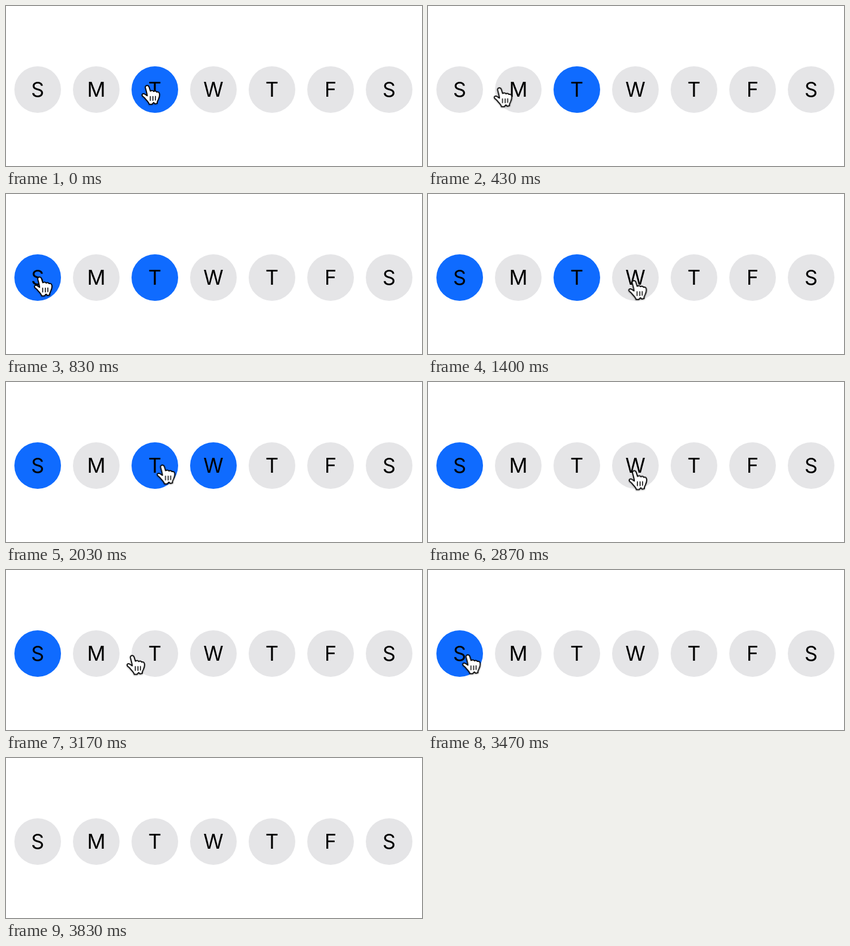
Animation, 696 px wide and 268 px high, one loop 4160 ms. Source, as an HTML page:

```html
<!DOCTYPE html>
<html lang="en">
<head>
<meta charset="utf-8">
<title>Day picker</title>
<style>
  html, body { margin: 0; width: 100%; height: 100%; overflow: hidden; background: #fff; }
  svg { display: block; width: 696px; height: 268px; }
  text { font: 400 34px Inter, Roboto, sans-serif; text-anchor: middle; fill: #000; }
  .day { fill: #e5e5e7; animation: 4160ms step-end infinite; }
  .sunday { animation-name: sunday; }
  .tuesday { animation-name: tuesday; }
  .wednesday { animation-name: wednesday; }

  @keyframes sunday {
    0%, 84.85%, 100% { fill: #e5e5e7; }
    19.94% { fill: #0f6bff; }
  }
  @keyframes tuesday {
    0% { fill: #0f6bff; }
    54.56%, 100% { fill: #e5e5e7; }
  }
  @keyframes wednesday {
    0%, 68.98%, 100% { fill: #e5e5e7; }
    40.13% { fill: #0f6bff; }
  }

  .pointer {
    animation: travel 4160ms ease-in-out infinite, leave 4160ms step-end infinite;
    filter: drop-shadow(0 1.5px 1.2px rgba(0, 0, 0, .35));
  }
  @keyframes travel {
    0%, 3.6% { transform: translate(0, 0); }
    15.1%, 21.15% { transform: translate(-180px, 6px); }
    34.1% { transform: translate(109px, 12px); }
    36.7%, 40.9% { transform: translate(112px, 12.5px); }
    48.7%, 58.9% { transform: translate(25.5px, 6px); }
    66.8%, 71.6% { transform: translate(109px, 15.5px); }
    81.2% { transform: translate(-177px, 4px); }
    83.35% { transform: translate(-169.5px, 9px); }
    89.1% { transform: translate(-169.5px, 9px); animation-timing-function: ease-in; }
    91.3%, 100% { transform: translate(-209px, -102px); }
  }
  @keyframes leave {
    0% { opacity: 1; }
    92.06%, 100% { opacity: 0; }
  }
</style>
</head>
<body>
<svg viewBox="0 0 696 268">
  <g>
    <circle class="day sunday" cx="53" cy="140" r="39"/>
    <circle class="day" cx="151" cy="140" r="39"/>
    <circle class="day tuesday" cx="249" cy="140" r="39"/>
    <circle class="day wednesday" cx="347" cy="140" r="39"/>
    <circle class="day" cx="445" cy="140" r="39"/>
    <circle class="day" cx="543" cy="140" r="39"/>
    <circle class="day" cx="641" cy="140" r="39"/>
  </g>
  <g>
    <text x="53" y="152.4">S</text>
    <text x="151" y="152.4">M</text>
    <text x="249" y="152.4">T</text>
    <text x="347" y="152.4">W</text>
    <text x="445" y="152.4">T</text>
    <text x="543" y="152.4">F</text>
    <text x="641" y="152.4">S</text>
  </g>
  <g class="pointer" stroke="#000" stroke-linejoin="round" stroke-linecap="round">
    <path fill="#fff" stroke-width="1.8" d="M233.2 136.6C232.6 132.6 238 132 239.3 135.6L241.6 142.6
      C243.6 141 246.2 141.5 247.2 143.2C249.2 141.8 251.4 142.6 252.1 144.2
      C254.2 143.2 256.2 144.4 256.6 146.6C257.3 150.2 256.4 153.6 254.8 156.6
      C253.4 159 252.8 161 253 163.2L249.2 163.8L247 161.6L244.4 164.6L239.6 164.6
      C239.4 161.6 236 158.8 233.4 155.8C231.8 153.6 230.2 152.6 228.4 150.8
      C226.4 148.4 228.8 146.2 231.4 147.2C233.2 148 234.6 149.2 236.2 150.4
      C236 146 234.2 141 233.2 136.6Z"/>
    <path fill="none" stroke-width="1.5" d="M241.4 151.6V158.2M245.8 151.4V158.2M250 151.2V157.8"/>
  </g>
</svg>
</body>
</html>
```
